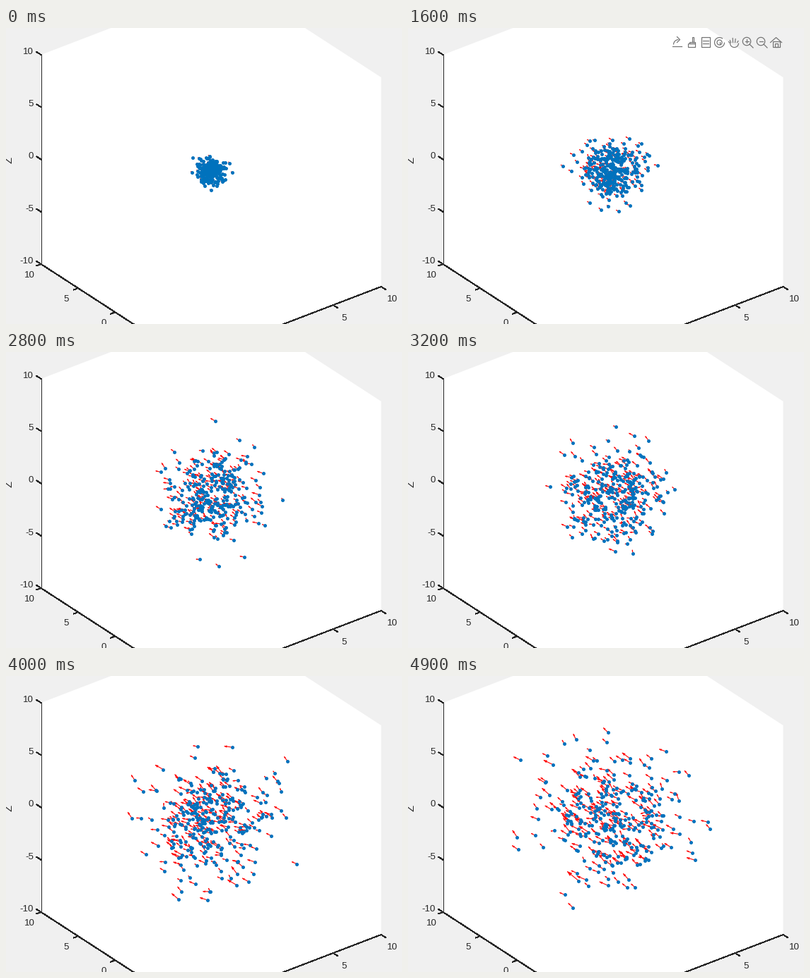
Write a matplotlib script that moves like this. It is 560x420 px and loops after 5000 ms.

```python
import numpy as np
import matplotlib.pyplot as plt
from matplotlib.animation import FuncAnimation
from matplotlib.collections import LineCollection, PolyCollection
from matplotlib.patches import Arc, Polygon, Rectangle

W, H, DPI = 560, 420, 100
PX = 72 / DPI
FRAMES, INTERVAL = 50, 100
COUNT, LIMIT = 300, 10
BACK, INK, BLUE, RED, ICON = "#f0f0f0", "#262626", "#0072bd", "#ff0000", "#737373"

# Orthographic projection: screen offset of one unit along x, y and z
CENTER = np.array([289.5, 202.0])
BASIS = np.array([[13.57, -5.22], [-10.48, -6.82], [0, -14.85]])


def project(points):
    return CENTER + np.asarray(points, float) @ BASIS


fig = plt.figure(figsize=(W / DPI, H / DPI), dpi=DPI, facecolor=BACK)
ax = fig.add_axes([0, 0, 1, 1])
ax.set_xlim(-0.5, W - 0.5)
ax.set_ylim(H - 0.5, -0.5)
ax.axis("off")


def edge(start, end):
    ax.plot(*np.transpose([start, end]), color=INK, lw=PX, antialiased=False)


def label(x, y, text, ha="center", size=13.3, **kw):
    ax.text(x, y, text, ha=ha, va="baseline", color=INK,
            fontsize=size * PX, family="Liberation Sans", **kw)


def draw_box():
    left, right, front = project(LIMIT * np.array([[-1, 1, -1], [1, -1, -1], [-1, -1, -1]]))
    back = left + right - front
    up = 2 * LIMIT * BASIS[2]
    ax.add_patch(Polygon([left + up, back + up, right + up, right, front, left],
                         fc="white", ec="none"))
    for corner in (left + up, front):
        edge(left, corner)
    edge(front, right)

    for v in range(-LIMIT, LIMIT + 1, 5):
        x, y, z = project([(v, -LIMIT, -LIMIT), (-LIMIT, v, -LIMIT), (-LIMIT, LIMIT, v)])
        edge(x, x - 0.58 * BASIS[1])
        edge(y, y - 0.45 * BASIS[0])
        edge(z, z + 0.58 * BASIS[1])
        label(x[0] + 15.5, x[1] + 21.5, str(v))
        label(y[0] - 16.5, y[1] + 18.7, str(v))
        label(38.5, z[1] - 1, str(v), "right")
    label(7.6, 187, "Z", size=14.7, rotation=90, rotation_mode="anchor")


class Icon:
    """Simple outline shapes placed around an icon centre."""
    parts = []

    def __init__(self, x, y=20):
        self.x, self.y = x, y

    def line(self, *points):
        x, y = np.transpose(points)
        self.parts += ax.plot(self.x + x, self.y + y, color=ICON, lw=1.2 * PX)
        return self

    def rect(self, x, y, w, h):
        box = Rectangle((self.x + x, self.y + y), w, h, fc="none", ec=ICON, lw=1.2 * PX)
        self.parts.append(ax.add_patch(box))
        return self

    def arc(self, x, y, r, start=0, end=360):
        arc = Arc((self.x + x, self.y + y), 2 * r, 2 * r, theta1=start, theta2=end,
                  ec=ICON, lw=1.2 * PX)
        self.parts.append(ax.add_patch(arc))
        return self


def draw_toolbar():
    export, brush, tip, turn, hand, zoom_in, zoom_out, home = (
        Icon(x) for x in np.linspace(380, 520, 8))
    export.arc(2, 3, 7, 180, 270).line((0, -8), (4, -4), (0, 0)).line((-7, 6), (6, 6))
    brush.rect(1, -7, 2, 7).rect(-3, 0, 8, 2).rect(-5, 2, 10, 5)
    tip.rect(-6, -7, 12, 14)
    for y in (-2, 2):
        tip.line((-4, y), (4, y))
    turn.arc(0, 0, 7, 0, 310).arc(0, 0, 3.5).line((0, 0), (0, 3))
    hand.arc(1, 1, 6, 0, 180).line((-5, 1), (-7, -1))
    for x in range(-4, 6, 3):
        hand.line((x, 0), (1.3 * x, abs(x) - 7))
    for zoom in (zoom_in, zoom_out):
        zoom.arc(-1.5, -1.5, 5.7).line((2.5, 2.5), (7.5, 7.5)).line((-4, -1.5), (1, -1.5))
    zoom_in.line((-1.5, -4), (-1.5, 1))
    home.line((-8, 0), (0, -7), (8, 0)).rect(-5, -1, 10, 8).rect(-2, 2, 4, 5)


draw_box()
draw_toolbar()
shafts = ax.add_collection(LineCollection([], colors=RED, lw=1.1 * PX, zorder=3))
heads = ax.add_collection(PolyCollection([], facecolors=RED, edgecolors=RED,
                                         lw=0.3 * PX, zorder=3))
dots, = ax.plot([], [], "o", ms=5 * PX, color=BLUE, mew=0, zorder=4)


def update(frame):
    rng = np.random.default_rng(700 + frame)
    spread = 0.47 + 0.046 * frame
    start = project(rng.normal(0, spread, (COUNT, 3)))
    # arrows lean along +y and lengthen with the cloud
    drift = rng.normal((0, 1, 0), 0.22, (COUNT, 3)) @ BASIS * 0.27 * spread
    tip = start + drift
    side = 0.12 * drift[:, ::-1] * (-1, 1)
    base = tip - 0.32 * drift

    dots.set_data(*start.T)
    shafts.set_segments(np.stack([start, tip], axis=1))
    heads.set_verts(np.stack([tip, base + side, base - side], axis=1))
    for part in Icon.parts:
        part.set_visible(10 <= frame < 18)
    return [shafts, heads, dots, *Icon.parts]


anim = FuncAnimation(fig, update, frames=FRAMES, interval=INTERVAL,
                     repeat=True, repeat_delay=0, blit=False)
plt.show()
```
